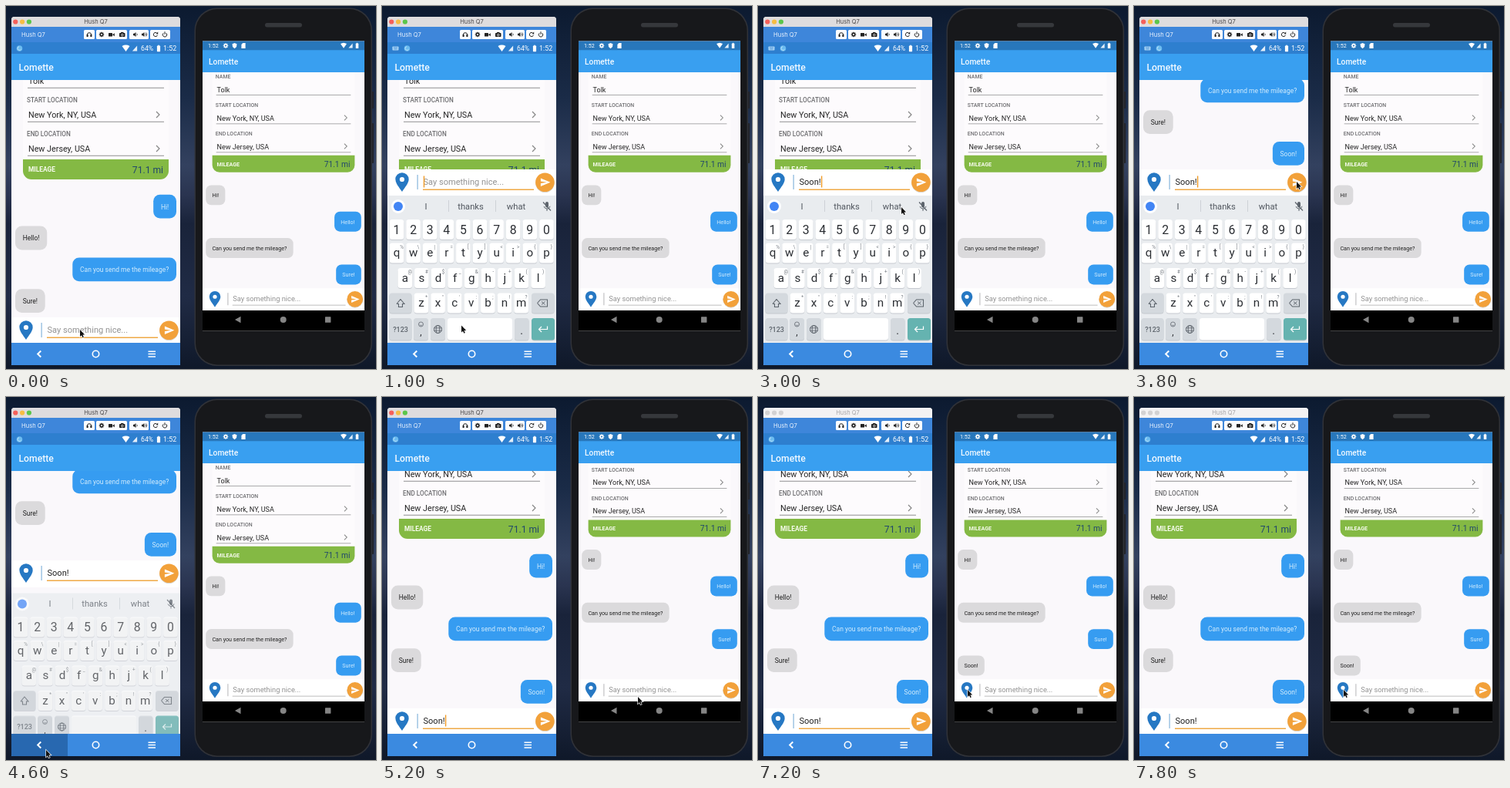
Write an HTML page with a canvas that moves like this. It is 480x471 px and loops after 8000 ms.

```html
<!DOCTYPE html>
<html lang="en">
<head>
<meta charset="utf-8">
<title>Chat on two phones</title>
<style>
html, body { margin: 0; width: 100%; height: 100%; overflow: hidden; background: #0e1727; }
canvas { display: block; width: 100vw; height: 100vh; }
</style>
</head>
<body>
<canvas id="stage"></canvas>
<script>
const W = 480, H = 471, LOOP = 8000, STEP = 200;
const canvas = document.getElementById('stage');
const c = canvas.getContext('2d');
const dpr = window.devicePixelRatio || 1;
canvas.width = W * dpr;
canvas.height = H * dpr;

const APP = 'Lomette', DEVICE = 'Hush Q7', PERSON = 'Tolk';
const BLUE = '#399ff0', PAPER = '#faf8fb', ORANGE = '#f2a13a';

// Pointer stops: time, x, y
const PATH = [
  [0, 96, 420], [600, 96, 420], [1400, 110, 409], [2200, 110, 409],
  [3000, 186, 261], [3400, 211, 228], [3800, 211, 228], [4400, 52, 458],
  [4600, 52, 458], [5200, 332, 389], [6000, 272, 380], [8000, 272, 380]
];

const clamp = v => Math.max(0, Math.min(1, v));
const ease = v => { v = clamp(v); return v * v * (3 - 2 * v); };

function box(x, y, w, h, fill, r = 0) {
  c.fillStyle = fill;
  c.beginPath();
  c.roundRect(x, y, w, h, r);
  c.fill();
}

function disc(x, y, r, fill) {
  c.fillStyle = fill;
  c.beginPath();
  c.arc(x, y, r, 0, 7);
  c.fill();
}

function ring(x, y, r, color, lw = 1, a = 0, b = Math.PI * 2) {
  c.strokeStyle = color;
  c.lineWidth = lw;
  c.beginPath();
  c.arc(x, y, r, a, b);
  c.stroke();
}

function trace(pts, x, y) {
  c.beginPath();
  for (let i = 0; i < pts.length; i += 2) c.lineTo(x + pts[i], y + pts[i + 1]);
}

function poly(pts, x, y, fill) {
  trace(pts, x, y);
  c.closePath();
  c.fillStyle = fill;
  c.fill();
}

function line(pts, x, y, color, lw = 1) {
  trace(pts, x, y);
  c.strokeStyle = color;
  c.lineWidth = lw;
  c.stroke();
}

// y is the middle of the capital letters
function text(s, x, y, size, color, align = 'left', weight = 400, font = 'Roboto') {
  c.font = `${weight} ${size}px ${font}, sans-serif`;
  c.textAlign = align;
  c.fillStyle = color;
  c.fillText(s, x, y + size * 0.355);
}

function clipped(x, y, w, h, draw) {
  c.save();
  c.beginPath();
  c.rect(x, y, w, h);
  c.clip();
  draw();
  c.restore();
}

function scaled(x, y, k, draw) {
  c.save();
  c.translate(x, y);
  c.scale(k, k);
  draw();
  c.restore();
}

function wallpaper() {
  const g = c.createLinearGradient(0, 0, 0, H);
  [[0, '#0c1a30'], [.25, '#1a2b47'], [.44, '#33415f'], [.52, '#2a3450'],
   [.6, '#19233a'], [.8, '#202b45'], [1, '#0f1829']].forEach(s => g.addColorStop(...s));
  c.fillStyle = g;
  c.fillRect(0, 0, W, H);
}

// ---- shared app parts, in units of the left phone ----

function appBar(w) {
  box(0, 0, w, 34, BLUE);
  text(APP, 9.5, 18, 12.2, '#f2f9ff', 'left', 500);
}

function chevron(x, y) {
  line([-2, -4, 2, 0, -2, 4], x, y, '#858585', 1.2);
}

function chatList(w, mine, messages) {
  const right = w - 15;
  box(15, -70, right - 15, 160, '#fdfbfd');
  [['NAME', PERSON], ['START LOCATION', 'New York, NY, USA'], ['END LOCATION', 'New Jersey, USA']]
    .forEach(([label, value], i) => {
      const y = 44 * (i - 1);
      text(label, 20, y, 8.2, '#6d6d70', 'left', 500);
      text(value, 22, y + 19.5, 10.75, '#262626');
      box(21, y + 27.8, w - 42, 0.9, '#8f8f91');
      if (i) chevron(w - 29, y + 19);
    });
  box(15, 77, right - 15, 26, '#84b944', [0, 0, 11, 11]);
  text('MILEAGE', 22, 90.3, 8.4, '#f7fbee', 'left', 700);
  text('71.1 mi', w - 22, 90.3, 12.1, '#20466c', 'right');

  messages.forEach((m, i) => {
    const own = i % 2 === mine;
    c.font = '400 8.5px Roboto, sans-serif';
    const bw = c.measureText(m).width + 19.5;
    const x = own ? w - 5 - bw : 5, y = 122.8 + 40.8 * i;
    box(x, y, bw, 30.8, own ? '#369cf1' : '#dbdadc', 8.5);
    text(m, x + 9.7, y + 15.8, 8.5, own ? '#d2ecfd' : '#202020');
  });
}

function inputBar(w, value, focused, caret) {
  box(0, 0, w, 35, '#fff');
  c.fillStyle = '#2678c3';
  c.beginPath();
  c.moveTo(19, 29);
  c.bezierCurveTo(15, 23, 10.5, 18, 10.5, 13);
  c.arc(19, 13, 8.7, Math.PI, 0);
  c.bezierCurveTo(27.5, 18, 23, 23, 19, 29);
  c.fill();
  disc(19, 13, 3.1, '#fff');
  box(38.6, 7, 1, 19, focused ? '#6fa6d6' : '#a6a6aa');
  text(value || 'Say something nice...', 46.5, 16.3, 11.05, value ? '#202020' : '#929292');
  box(46, 25.4, w - 75, focused ? 1.5 : 0.9, focused ? '#efa946' : '#a8a8a8');
  if (caret) {
    const end = value ? c.measureText(value).width : 0;
    box(46.8 + end, 8.5, 1.4, 15, '#f09a26');
  }
  disc(w - 14.6, 17.8, 12.3, '#d9d4cd');
  disc(w - 14.6, 16.8, 12.3, ORANGE);
  poly([-5.5, -5.3, 7, 0, -5.5, 5.3, -5.5, 1.2, 2.5, 0, -5.5, -1.2], w - 14.6, 16.8, '#fff');
}

function wifi(x, y, k) {
  poly([-5 * k, -3 * k, -2.5 * k, -4.2 * k, 0, -4.6 * k, 2.5 * k, -4.2 * k, 5 * k, -3 * k, 0, 4 * k], x, y, '#fff');
}

function signal(x, y, k) {
  poly([-3.5 * k, 4 * k, 3.5 * k, -4 * k, 3.5 * k, 4 * k], x, y, '#e3effa');
}

function battery(x, y, k) {
  box(x - 2.2 * k, y - 3.6 * k, 4.4 * k, 8 * k, '#fff', 0.6);
  box(x - k, y - 4.6 * k, 2 * k, 1.2 * k, '#fff');
}

function gear(x, y, r, color, hole) {
  for (let i = 0; i < 8; i++) {
    const a = i * Math.PI / 4;
    line([0, 0, Math.cos(a) * r, Math.sin(a) * r], x, y, color, 1.2);
  }
  disc(x, y, r * 0.75, color);
  disc(x, y, r * 0.32, hole);
}

// ---- left window ----

function toolbar() {
  box(7, 27, 219, 20, '#3e86da');
  text(DEVICE, 20, 37.2, 7.6, '#eaf3fd', 'left', 400, 'Inter');
  [[101, 14], [117, 40], [160, 25], [187, 26]].forEach(([x, w]) => box(x, 31, w, 12, '#fbfcfe', 1.5));
  const ink = '#222';
  ring(108, 37.4, 2.7, ink, 1, Math.PI, 0);
  box(104.6, 37, 2, 3, ink);
  box(109.4, 37, 2, 3, ink);
  gear(124, 37, 3.3, ink, '#fff');
  box(133, 35, 5, 4.5, ink, 0.6);
  poly([0, 0, 2.8, -2, 2.8, 2], 138, 37.2, ink);
  box(147, 35, 7.5, 5, ink, 0.8);
  box(149, 34, 3.5, 2, ink);
  ring(150.8, 37.6, 1.3, '#fff', 0.8);
  for (const x of [165, 176]) poly([0, -1.2, 1.5, -1.2, 3.4, -3, 3.4, 3, 1.5, 1.2, 0, 1.2], x, 37, ink);
  ring(168.5, 37, 1.7, ink, 0.8, -0.9, 0.9);
  ring(179.5, 37, 1.7, ink, 0.8, -0.9, 0.9);
  ring(179.5, 37, 3.2, ink, 0.8, -0.9, 0.9);
  ring(194, 37, 2.6, ink, 1, 0.3, 5.4);
  poly([0, 0, 2.6, -2.6, 2.6, 0.4], 194.6, 36.2, ink);
  ring(206, 37.3, 2.7, ink, 1, -0.9, 4);
  box(205.5, 33.3, 1, 3.5, ink);
}

function statusLeft(keysOpen) {
  box(7, 47, 219, 15, '#2e7fcf');
  let x = 17.5;
  if (keysOpen) {
    box(13.5, 52.5, 8, 5, '#a8d4f5', 0.8);
    line([1.5, 1.5, 6.5, 1.5], 13.5, 52.5, '#2e7fcf', 0.7);
    line([2, 3.4, 6, 3.4], 13.5, 52.5, '#2e7fcf', 0.7);
    x = 32.5;
  }
  disc(x, 55, 3.8, '#6bbcf0');
  ring(x, 55, 2.4, '#c4e6fb', 0.9, 0.5, 4.5);
  wifi(155.5, 55, 1);
  signal(167, 55, 0.9);
  text('64%', 175, 55.2, 8.7, '#fff');
  battery(198, 55, 0.95);
  text('1:52', 204, 55.2, 8.9, '#fff');
}

function keyCap(x, y, w, h, fill = '#fff') {
  box(x, y + 1, w, h, '#c6cad0', 3.5);
  box(x, y, w, h, fill, 3.5);
}

function keyboard(dy, alpha) {
  c.save();
  c.globalAlpha = alpha;
  c.translate(0, dy);
  const ink = '#2b2e33', soft = '#5d646c', grey = '#d4d9de';
  box(7, 246, 219, 191, '#e9ecef');
  disc(21, 260, 9, '#fff');
  disc(21, 260, 6, '#4285f4');
  [['I', 57], ['thanks', 115], ['what', 174]].forEach(([s, x]) => text(s, x, 260, 11.2, '#50565e', 'center'));
  box(86, 252, 0.8, 15, '#c6cbd0');
  box(147, 252, 0.8, 15, '#c6cbd0');
  box(212, 254, 4, 7.5, soft, 2);
  ring(214, 259, 4, soft, 1, 0.2, 2.9);
  box(213.5, 263, 1, 3, soft);
  line([-5, -5.5, 5, 5.5], 214, 260, soft, 1.2);

  [['1234567890', '', 19, 290], ['qwertyuiop', '%\\|=[]<>{}', 19, 320.5],
   ['asdfghjkl', '@#$_&-+()', 29.8, 353], ['zxcvbnm', '*"\':;!?', 51, 385.5]]
    .forEach(([keys, marks, x0, y], row) => [...keys].forEach((k, i) => {
      const x = x0 + 21.6 * i;
      keyCap(x - 9.3, y - 13, 18.6, 26);
      text(k, x, y + (row ? -0.8 : 0), row ? 15.2 : 15.8, ink, 'center');
      if (marks) text(marks[i], x + 6.5, y - 8, 6.3, '#777d84', 'center');
    }));

  keyCap(9.5, 372.5, 29, 26, grey);
  line([-5, 1, 0, -5, 5, 1, 2.5, 1, 2.5, 5, -2.5, 5, -2.5, 1, -5, 1], 24, 385.5, soft, 1.1);
  keyCap(194, 372.5, 29.5, 26, grey);
  line([-7, 0, -3, -4.5, 6, -4.5, 6, 4.5, -3, 4.5, -7, 0], 208.5, 385.5, soft, 1.1);
  line([-1.5, -2, 3, 2], 208.5, 385.5, soft);
  line([3, -2, -1.5, 2], 208.5, 385.5, soft);

  [[9.5, 29], [41, 19], [63, 19], [172, 18.5]].forEach(([x, w]) => keyCap(x, 405, w, 28.5, grey));
  keyCap(85, 405, 84, 28.5);
  keyCap(194, 405, 30, 28.5, '#65b3b0');
  text('?123', 24, 419.5, 9, soft, 'center', 500);
  ring(50.5, 413, 3, soft, 0.8);
  ring(50.5, 413.3, 1.4, soft, 0.7, 0.2, 2.9);
  text(',', 50.5, 423, 12, ink, 'center');
  ring(72.5, 419.5, 5, soft, 1);
  c.beginPath();
  c.ellipse(72.5, 419.5, 2.3, 5, 0, 0, 7);
  c.stroke();
  line([-5, -1.7, 5, -1.7], 72.5, 419.5, soft, 0.8);
  line([-5, 1.7, 5, 1.7], 72.5, 419.5, soft, 0.8);
  text('.', 181, 421, 14, ink, 'center');
  line([5.5, -3.5, 5.5, 0.5, -5, 0.5], 209, 419, '#fff', 1.2);
  line([-2, -3, -5.5, 0.5, -2, 4], 209, 419, '#fff', 1.2);
  c.restore();
}

function leftWindow(t) {
  const resized = t >= 800 && t < 4800;
  const sent = t >= 3800;
  const active = t < 7200;
  const scroll = !sent ? 0 : resized ? 232 : 41;
  const fieldTop = resized ? 212 : 404;
  const typed = 'Soon!'.slice(0, Math.max(0, Math.floor((t - 1800) / 200)));
  const caret = t >= 800 && t < 5800 && (t - 2800) % 1000 < 500;

  c.save();
  c.beginPath();
  c.roundRect(7, 14, 219, 452, [4, 4, 1, 1]);
  c.clip();
  box(7, 14, 219, 452, PAPER);
  clipped(7, 96, 219, fieldTop - 96, () => scaled(7, 122 - scroll, 1, () =>
    chatList(219, 0, ['Hi!', 'Hello!', 'Can you send me the mileage?', 'Sure!'].concat(sent ? 'Soon!' : []))));
  scaled(7, fieldTop, 1, () => inputBar(219, typed, true, caret));
  if (t >= 600 && t < 4800) {
    if (t < 800) keyboard(24, 0.5);
    else if (t < 4600) keyboard(0, 1);
    else keyboard(8.5, 0.72);
  }
  box(7, 437, 219, 29, '#3b8ae0');
  if (t >= 4400 && t < 4800) box(7, 437, 73, 29, '#2868b0');
  line([2.3, -4, -1.8, 0, 2.3, 4], 43, 451.5, '#fff', 2);
  ring(116.5, 451.5, 4.2, '#fff', 1.6);
  for (const d of [-3.4, 0, 3.4]) box(184.5, 450.8 + d, 9.5, 1.5, '#fff');

  box(7, 14, 219, 13, active ? '#dedcde' : '#f3f2f3');
  (active ? ['#f5605a', '#f6bd42', '#5bc64b'] : ['#d3d2d3', '#d3d2d3', '#d3d2d3'])
    .forEach((f, i) => disc(12.3 + 8.8 * i, 20.5, 3.1, f));
  text(DEVICE, 116.5, 20.7, 7.5, active ? '#474548' : '#a5a3a6', 'center', 400, 'Inter');
  toolbar();
  statusLeft(t >= 600 && t < 4600);
  scaled(7, 62, 1, () => appBar(219));
  c.restore();
}

// ---- right phone ----

function rightPhone(t) {
  const k = 0.842, w = 210 / k;
  box(474, 111, 3, 22, '#22242a', 1);
  box(474, 152, 3, 52, '#22242a', 1);
  box(244.5, 2.5, 230.5, 464.5, '#303238', 29);
  box(246, 4, 227.5, 461.5, '#17181b', 28);
  box(336, 22, 48, 5.5, '#36383c', 2.7);
  box(255, 45.5, 210, 376, PAPER);

  clipped(255, 85, 210, 281, () => scaled(255, 129 - 34.3 * ease((t - 4700) / 400), k, () =>
    chatList(w, 1, ['Hi!', 'Hello!', 'Can you send me the mileage?', 'Sure!'].concat(t >= 5400 ? 'Soon!' : []))));
  clipped(255, 366, 210, 29, () => scaled(255, 366.3, k, () => inputBar(w, '', false, false)));

  box(255, 45.5, 210, 12.5, '#2877bb');
  text('1:52', 262, 51.8, 7.2, '#fff');
  gear(285, 51.5, 3.3, '#fff', '#2877bb');
  poly([-3, -2.2, 0, -3.6, 3, -2.2, 2.5, 1.5, 0, 3.8, -2.5, 1.5], 296.5, 51.5, '#fff');
  poly([-2.6, -1.5, -0.8, -3.4, 2.6, -3.4, 2.6, 3.4, -2.6, 3.4], 308, 51.5, '#fff');
  wifi(438, 51.5, 0.8);
  signal(447, 51.5, 0.75);
  battery(455.5, 51.5, 0.8);
  scaled(255, 57.3, k, () => appBar(w));

  box(255, 395, 210, 26.5, '#000');
  poly([-4, 0, 3.5, -4.3, 3.5, 4.3], 301, 407, '#858585');
  disc(359.7, 407, 4, '#858585');
  box(414, 403.3, 7.4, 7.4, '#858585', 0.5);
}

function pointer(t) {
  const i = Math.max(1, PATH.findIndex(p => p[0] > t));
  const [t0, x0, y0] = PATH[i - 1], [t1, x1, y1] = PATH[i];
  const p = ease((t - t0) / (t1 - t0));
  const arrow = [0, 0, 0, 9, 2, 7.2, 3.4, 10.2, 4.8, 9.6, 3.5, 6.6, 6.2, 6.4];
  const x = x0 + (x1 - x0) * p, y = y0 + (y1 - y0) * p;
  trace(arrow, x, y);
  c.closePath();
  c.strokeStyle = '#fff';
  c.lineWidth = 1.3;
  c.stroke();
  c.fillStyle = '#111';
  c.fill();
}

function draw(now) {
  const t = Math.floor((now % LOOP) / STEP) * STEP;
  c.setTransform(dpr, 0, 0, dpr, 0, 0);
  wallpaper();
  rightPhone(t);
  leftWindow(t);
  pointer(t);
}

const start = performance.now();
function frame() {
  draw(performance.now() - start);
  requestAnimationFrame(frame);
}
frame();
</script>
</body>
</html>
```
